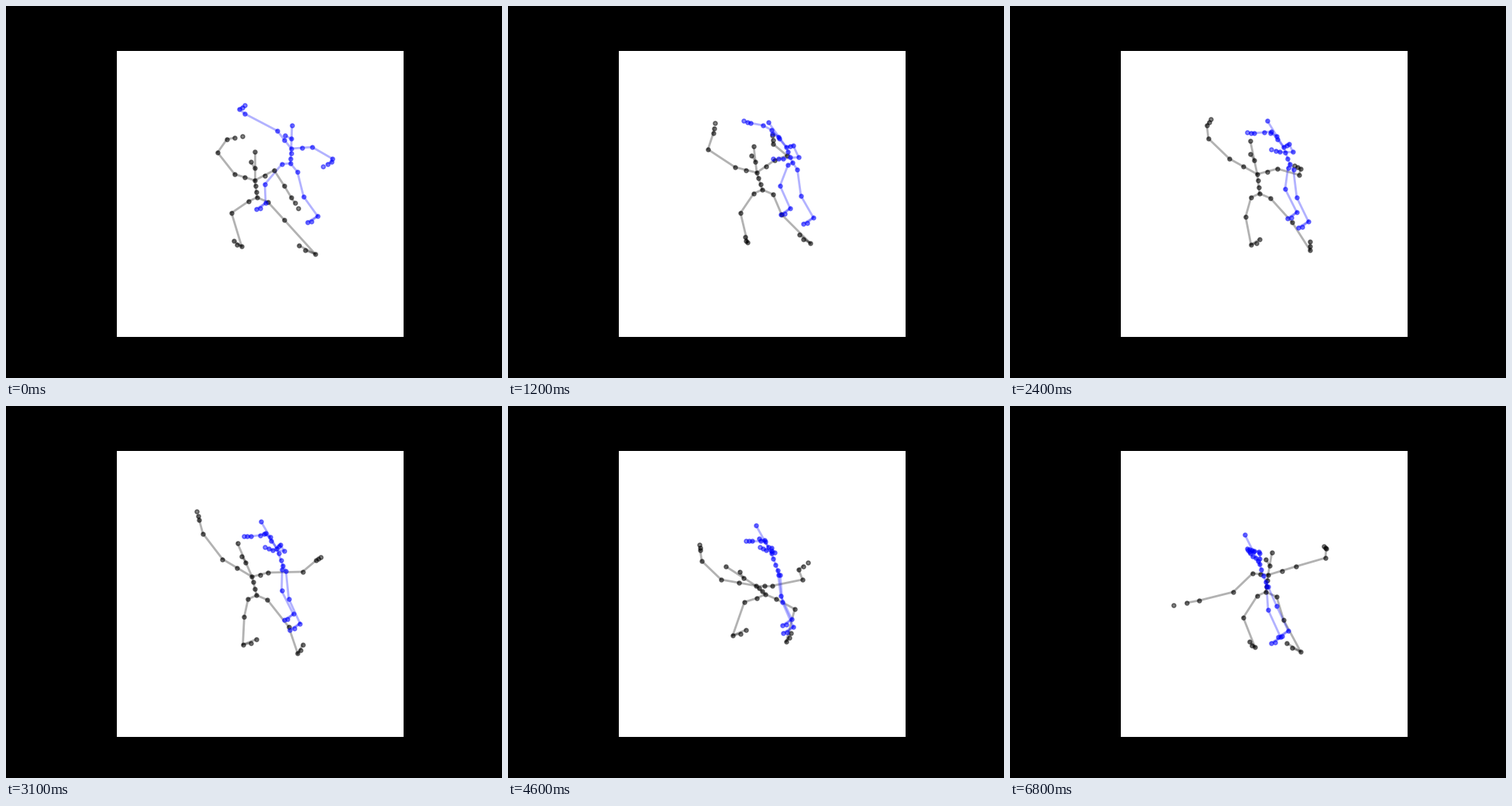
Animation, 640 px wide and 480 px high, one loop 6900 ms. Source, as a matplotlib script:

```python
import numpy as np
import matplotlib.pyplot as plt
from matplotlib.animation import FuncAnimation
from matplotlib.patches import Rectangle

W, H, DPI = 640, 480, 100
FRAMES, STEP = 69, 100
ARM = np.array([0, 0.35, 0.7, 1])  # how far a swing carries each arm joint


def mix(a, b, u):
    return a + (b - a) * u


def spline(times, pts, t):
    """Cubic Hermite curve through the keys with finite-difference slopes."""
    slope = np.gradient(pts, times, axis=0)
    i = int(np.clip(np.searchsorted(times, t, side="right") - 1, 0, len(times) - 2))
    h = times[i + 1] - times[i]
    u = (t - times[i]) / h
    return ((1 + 2 * u) * (1 - u) ** 2 * pts[i] + u * (1 - u) ** 2 * h * slope[i]
            + u * u * (3 - 2 * u) * pts[i + 1] + u * u * (u - 1) * h * slope[i + 1])


def bump(t, peak, width):
    d = min(abs(t - peak) / width, 1)
    return (1 + np.cos(np.pi * d)) / 2


class Dancer:
    """Points are complex numbers, x + yj in pixels."""

    def __init__(self, color, hips, nose, toes, toe_swing):
        self.color, self.hips, self.nose = color, hips, nose
        self.toes, self.toe_swing = toes, toe_swing
        self.keys, self.swings = [], []

    def pose(self, t, body, arm_a, arm_b, legs):
        """body: pelvis, chest, crown; arm: shoulder, elbow, wrist, tip;
        legs: knee and ankle of each."""
        self.keys.append((t, [*body, *arm_a, *arm_b, *legs]))

    def swing(self, arm, peak, width, reach):
        self.swings.append((arm, peak, width, reach))

    def chains(self, t):
        """Joint chains to draw as bones, with the loose fingertips last."""
        p = spline(self.times, self.points, t)
        pelvis, chest, crown = p[:3]
        arms, legs = p[3:11].reshape(2, 4), p[11:].reshape(2, 2)
        for arm, peak, width, reach in self.swings:
            arms[arm] += ARM * reach * bump(t, peak, width)

        neck = mix(chest, crown, 0.42)
        chains = [[pelvis, mix(pelvis, chest, 0.33), mix(pelvis, chest, 0.7), chest, neck, crown],
                  [neck, neck + self.nose]]
        for shoulder, elbow, wrist, tip in arms:
            chains.append([chest, mix(chest, shoulder, 0.5), shoulder, elbow, wrist,
                           mix(wrist, tip, 0.5)])
        ease = 1 - (1 - t / (FRAMES - 1)) ** 3
        for (knee, ankle), hip, toe in zip(legs, self.hips, self.toes):
            toe = toe - self.toe_swing * np.cos(2 * np.pi * t / 76)
            foot = ankle + 0.6 * toe + 2j
            chains.append([pelvis, pelvis + mix(*hip, ease), knee, ankle, foot])
            chains.append([ankle, ankle + toe])
        return chains, list(arms[:, 3])

    def build(self, ax):
        self.times = np.array([t for t, _ in self.keys], float)
        self.points = np.array([pts for _, pts in self.keys])
        bones = sum(len(c) - 1 for c in self.chains(0)[0])
        self.lines = [ax.plot([], [], color=self.color, lw=2, alpha=0.3, zorder=2)[0]
                      for _ in range(bones)]
        self.dots = ax.scatter([], [], s=14, color=self.color, lw=1, alpha=0.5, zorder=3)

    def draw(self, t):
        chains, tips = self.chains(t)
        bones = [pair for c in chains for pair in zip(c, c[1:])]
        for line, (a, b) in zip(self.lines, bones):
            line.set_data([a.real, b.real], [a.imag, b.imag])
        joints = np.array([chains[0][0]] + [b for _, b in bones] + tips)
        self.dots.set_offsets(np.column_stack([joints.real, joints.imag]))


dark = Dancer("black", hips=[(-11 + 5j, -11 + 5j), (14 + 6j, 14 + 6j)],
              nose=-5 - 8j, toes=[5 - 7j, -6 - 11j], toe_swing=15)
dark.pose(0, [324+247j, 321+225j, 321+188j], [295+217j, 273+189j, 285+172j, 305+168j],
          [346+212j, 359+232j, 368+247j, 377+261j], [291+267j, 304+310j, 359+276j, 399+320j])
dark.pose(12, [328+237j, 321+215j, 317+181j], [293+208j, 258+185j, 265+164j, 267+151j],
          [344+199j, 360+193j, 342+178j, 341+167j], [300+267j, 309+305j, 353+269j, 390+306j])
dark.pose(24, [322+242j, 319+217j, 310+174j], [283+197j, 256+171j, 254+154j, 259+146j],
          [345+210j, 373+218j, 375+210j, 367+206j], [304+272j, 311+308j, 364+279j, 387+315j])
dark.pose(38, [327+245j, 317+225j, 287+186j], [277+205j, 258+172j, 259+158j, 255+147j],
          [333+221j, 363+210j, 360+190j, 357+184j], [309+267j, 298+305j, 365+283j, 365+318j])
dark.pose(46, [332+243j, 320+232j, 281+207j], [275+224j, 250+200j, 248+186j, 247+179j],
          [341+232j, 380+224j, 375+211j, 387+202j], [305+253j, 290+296j, 370+262j, 359+304j])
dark.pose(58, [332+240j, 340+229j, 337+216j], [305+227j, 259+232j, 242+226j, 226+219j],
          [373+234j, 421+226j, 407+218j, 389+210j], [288+260j, 282+298j, 361+272j, 364+313j])
dark.pose(68, [330+240j, 333+218j, 338+189j], [313+216j, 288+240j, 244+251j, 211+257j],
          [369+207j, 407+196j, 408+184j, 405+181j], [301+273j, 316+311j, 353+276j, 375+317j])
dark.swing(0, 19, 5, -20)
dark.swing(0, 32, 6, -12 - 6j)
dark.swing(0, 42, 4, -11)
dark.swing(0, 64, 4, -18)
dark.swing(1, 31, 7, 46)
dark.swing(1, 50, 4, 44)

blue = Dancer("blue", hips=[(-11 + 1j, 1 + 6j), (9 + 11j, 3 + 6j)],
              nose=-8 - 4j, toes=[-12 + 8j, -13 + 8j], toe_swing=0)
blue.pose(0, [367+203j, 368+184j, 369+154j], [350+161j, 308+139j, 301+133j, 308+128j],
          [395+182j, 421+197j, 420+201j, 409+207j], [334+230j, 335+254j, 384+246j, 402+271j])
blue.pose(12, [367+202j, 359+182j, 336+150j], [340+160j, 329+154j, 313+151j, 304+148j],
          [368+180j, 375+195j, 355+197j, 342+197j], [351+232j, 364+261j, 378+245j, 394+273j])
blue.pose(24, [361+204j, 353+182j, 332+148j], [337+162j, 328+163j, 315+164j, 306+163j],
          [360+178j, 365+188j, 348+188j, 337+185j], [355+236j, 370+266j, 370+247j, 385+278j])
blue.pose(46, [348+212j, 340+190j, 320+154j], [331+173j, 326+174j, 315+174j, 307+174j],
          [340+183j, 344+189j, 333+186j, 325+182j], [352+245j, 366+275j, 354+253j, 368+285j])
blue.pose(68, [330+227j, 322+204j, 303+166j], [317+196j, 313+194j, 310+190j, 307+186j],
          [322+190j, 321+188j, 315+187j, 309+185j], [333+263j, 349+298j, 344+258j, 359+290j])
blue.swing(0, 3, 3, -15j)

fig = plt.figure(figsize=(W / DPI, H / DPI), dpi=DPI, facecolor="black")
ax = fig.add_axes([0, 0, 1, 1])
ax.set(xlim=(0, W), ylim=(H, 0))
ax.axis("off")
ax.add_patch(Rectangle((143, 58), 370, 369, fc="white", ec="none", zorder=0))
for dancer in (dark, blue):
    dancer.build(ax)


def update(t):
    dark.draw(t)
    blue.draw(t)


anim = FuncAnimation(fig, update, frames=FRAMES, interval=STEP,
                     repeat=True, repeat_delay=0)
plt.show()
```
